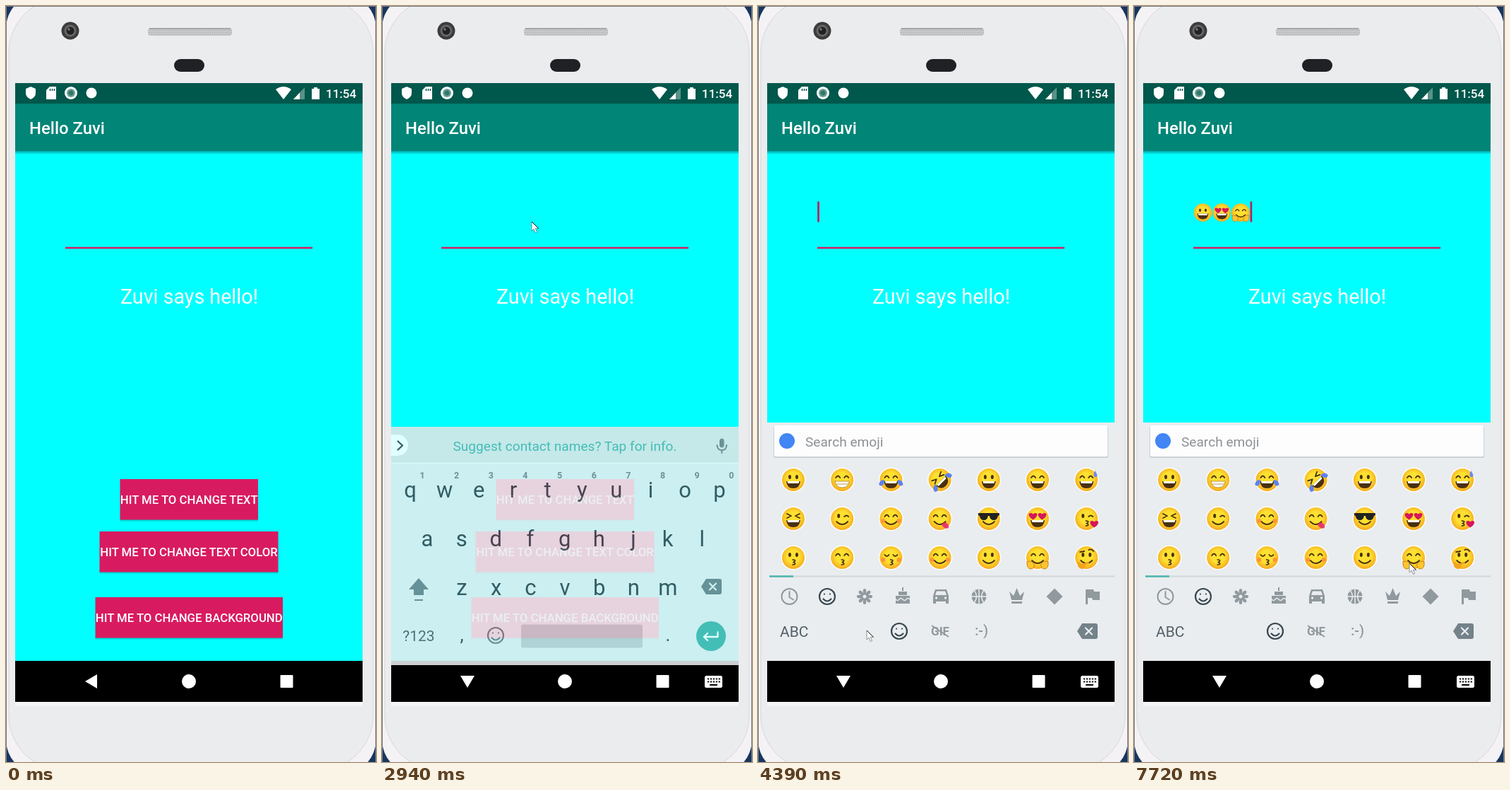
An HTML page that plays this animation: 524 by 1069 pixels, repeating every 8000 ms.

```html
<!DOCTYPE html>
<html lang="en">
<head>
<meta charset="utf-8">
<style>
html, body { margin: 0; width: 100%; height: 100%; overflow: hidden; background: #fff; }
svg { display: block; width: 100vw; height: 100vh; font-family: Roboto, sans-serif; }
.mid { text-anchor: middle; }
.medium { font-weight: 500; }
.line { fill: none; stroke-linecap: round; stroke-linejoin: round; }
</style>
</head>
<body>
<svg viewBox="0 0 524 1069">
  <defs>
    <radialGradient id="skin" cy=".45" r=".55">
      <stop offset=".5" stop-color="#fde030"/><stop offset="1" stop-color="#f5a91f"/>
    </radialGradient>
    <linearGradient id="shade" x2="0" y2="1">
      <stop stop-color="#000" stop-opacity=".35"/><stop offset="1" stop-color="#000" stop-opacity="0"/>
    </linearGradient>
    <pattern id="mesh" width="3" height="3" patternUnits="userSpaceOnUse">
      <rect width="3" height="3" fill="#c9cbcb"/><circle cx="1.5" cy="1.5" r=".8" fill="#aeb1b1"/>
    </pattern>
    <path id="erase" d="M-14 0L-7-11H12Q15-11 15-8V8Q15 11 12 11H-7Z"/>
    <g id="smiley" class="line" stroke-width="2.2">
      <circle r="11"/><path d="M-5.5 3.5Q0 9.5 5.5 3.5M-4-3.5v.1M4-3.5v.1"/>
    </g>
  </defs>

  <!-- phone -->
  <rect width="524" height="1069" fill="#17365d"/>
  <rect y="-18" width="524" height="1105" rx="50" fill="#f4f2f5"/>
  <rect x="4" y="-12" width="516" height="1093" rx="78" fill="#ebecee" stroke="#d9d6da"/>
  <path d="M.5 1069V.5H523.5V1069" fill="none" stroke="#77797c"/>
  <circle cx="91" cy="35" r="12.5" fill="#3c3c3c"/>
  <circle cx="91" cy="35" r="8.5" fill="#666"/>
  <circle cx="91" cy="35" r="5.5" fill="#222"/>
  <circle cx="89" cy="33" r="1.8" fill="#778"/>
  <rect x="201" y="31" width="119" height="11" rx="4" fill="url(#mesh)"/>
  <path d="M203 32H318" stroke="#9b9e9e" stroke-width="1.5"/>
  <rect x="238" y="75" width="43" height="18" rx="9" fill="#202124"/>
  <rect x="13" y="984" width="492" height="6" fill="#f5f5f7"/>

  <!-- app -->
  <rect x="13" y="109" width="492" height="817" fill="#0ff"/>
  <rect x="13" y="205" width="492" height="5" fill="url(#shade)"/>
  <rect x="13" y="109" width="492" height="29" fill="#00574b"/>
  <rect x="13" y="138" width="492" height="67" fill="#008577"/>
  <g fill="#fff">
    <path d="M35 114L42 117V123Q42 129 35 132Q28 129 28 123V117Z"/>
    <path d="M62 114H71V132H57V119Z"/>
    <path d="M62.500 117v3M65.500 117v3M68.500 117v3" stroke="#00574b" stroke-width="1.5"/>
    <circle cx="92" cy="123" r="9"/><circle cx="92" cy="123" r="6" fill="#6b9f96"/>
    <circle cx="92" cy="123" r="3.500" fill="#2f776b"/>
    <circle cx="121" cy="123" r="7.500"/>
    <path d="M382 118Q393 110 404 118L393 132Z"/>
    <path d="M407 132L423 115V132Z" opacity=".35"/><path d="M407 132L416 122.500V132Z"/>
    <path d="M436 115H441V117H444V132H433V117H436Z"/>
    <text class="medium" x="453" y="130" font-size="17">11:54</text>
    <text class="medium" x="33" y="180.500" font-size="23.900">Hello Zuvi</text>
    <text class="mid" x="259.500" y="421" font-size="28.700">Zuvi says hello!</text>
  </g>
  <path d="M84 342H434" stroke="#d81b60" stroke-width="2.400"/>
  <g id="buttons" class="mid medium" font-size="16.750"></g>
  <g id="typed"></g>
  <rect id="caret" y="276.500" width="2.600" height="29" fill="#c2185b"/>

  <!-- navigation -->
  <rect x="13" y="926" width="492" height="58" fill="#000"/>
  <g fill="#fff">
    <path id="back"/>
    <circle cx="259" cy="955" r="10"/><rect x="388.500" y="946" width="18" height="18" rx="1"/>
    <g id="switcher">
      <rect x="457" y="947" width="25" height="17" rx="2.500"/>
      <path d="M461 951.500H479M461 955.500H479" stroke="#000" stroke-width="2.200" stroke-dasharray="2.200 1.700"/>
      <path d="M464 960H475" stroke="#000" stroke-width="2"/>
    </g>
  </g>

  <!-- letter keyboard -->
  <g id="letters" fill="#37474f">
    <rect x="13" y="589" width="492" height="337" fill="#e9edf0"/>
    <rect x="13" y="589" width="492" height="51" fill="#e1e5e7"/>
    <path d="M13 640.500H505" stroke="#f4f6f7" stroke-width="2"/>
    <path d="M13 600H22A15 15 0 0 1 22 630H13Z" fill="#fff"/>
    <path class="line" d="M22.500 609.500L29 615.500L22.500 621.500" stroke="#37474f" stroke-width="2.300"/>
    <text class="mid" x="259" y="622.500" font-size="19.100" fill="#4db6ac">Suggest contact names? Tap for info.</text>
    <g fill="#78848b" stroke="#78848b">
      <rect x="478.500" y="606" width="5.500" height="12" rx="2.750"/>
      <path class="line" d="M474.500 615Q475 622 481.300 622T488 615M481.300 622V626" stroke-width="2"/>
    </g>
    <g id="keys" class="mid"></g>
    <path d="M52 803L66 819H59V827H45V819H38ZM46 833H58V835H46Z" fill="#74828a"/>
    <use href="#erase" x="466" y="815" fill="#74828a"/>
    <path class="line" d="M464 810.500l9 9m0-9l-9 9" stroke="#e9edf0" stroke-width="2.300"/>
    <use href="#smiley" x="161" y="884" stroke="#74828a"/>
    <rect x="197" y="868.500" width="172" height="33" rx="3" fill="#c8cdd1"/>
    <circle cx="466" cy="885" r="21" fill="#4db6ac"/>
    <path class="line" d="M475.500 879.500V886H456M461 881L456 886L461 891" stroke="#fff" stroke-width="2.400"/>
  </g>

  <!-- emoji keyboard -->
  <g id="emoji">
    <rect x="13" y="589" width="492" height="337" fill="#e9edf0"/>
    <rect x="22" y="594" width="474" height="45" rx="2" fill="#cdd1d4"/>
    <rect x="23" y="593" width="472" height="44" rx="2" fill="#fdfdfd"/>
    <circle cx="41" cy="615" r="11" fill="#4285f4"/>
    <text x="67" y="622.500" font-size="19.100" fill="#8c9194">Search emoji</text>
    <g id="faces"></g>
    <path d="M16 806.500H505" stroke="#d3d8da" stroke-width="2"/>
    <path d="M16 806.500H50" stroke="#4db6ac" stroke-width="2.500"/>
    <g fill="#90999e" stroke="#90999e" stroke-width="0">
      <g class="line" stroke-width="2"><circle cx="44.500" cy="835" r="11"/><path d="M44.500 828V836L50 839.500"/></g>
      <g id="flower" transform="translate(151 835)"></g>
      <path d="M195 845V834H215V845ZM199 833V828H211V833ZM204 827V822H206V827Z"/>
      <path class="line" d="M195 839q2.500 3 5 0t5 0t5 0t5 0" stroke="#e9edf0" stroke-width="1.500"/>
      <path d="M248 845V834L251 825H267L270 834V845H266V842H252V845Z"/>
      <path d="M251 833L253 827.500H265L267 833Z" fill="#e9edf0"/>
      <circle cx="252.500" cy="837" r="1.700" fill="#e9edf0"/><circle cx="265.500" cy="837" r="1.700" fill="#e9edf0"/>
      <circle cx="313" cy="835" r="10.500"/>
      <path d="M313 824V846M302 835H324M306 826Q313 835 306 844M320 826Q313 835 320 844" fill="none" stroke="#e9edf0" stroke-width="1.500"/>
      <path d="M359 840L356 828L362 834L366.500 823L371 834L377 828L374 840ZM359 842H374V845H359Z"/>
      <path d="M420 823.500L431.500 835L420 846.500L408.500 835Z"/>
      <path d="M464 825H475L476 828H484V840H474L473 837H467V846H464Z"/>
      <text class="mid" x="258" y="890" font-size="17" font-weight="700">GIF</text>
      <path d="M246 876L270 892" stroke-width="2"/>
    </g>
    <use href="#smiley" x="98" y="835" stroke="#37474f"/>
    <use href="#smiley" x="200" y="884" stroke="#37474f"/>
    <text x="31" y="892" font-size="21" fill="#546067">ABC</text>
    <text class="mid medium" x="316.500" y="890" font-size="20" fill="#90999e">:-)</text>
    <use href="#erase" x="466" y="884" fill="#74828a"/>
    <path class="line" d="M464 879.500l9 9m0-9l-9 9" stroke="#e9edf0" stroke-width="2.300"/>
  </g>

  <g id="pointer">
    <path d="M0 0V13L3 10.200L5.300 15.500L7.500 14.500L5.200 9.400H9.500Z" fill="#fff" stroke="#666" stroke-width=".7"/>
    <path d="M0 0L9.500 9.400" stroke="#111"/>
  </g>
</svg>
<script>
const $ = id => document.getElementById(id);
const show = (id, on) => $(id).setAttribute('visibility', on ? 'visible' : 'hidden');
const move = (id, x, y) => $(id).setAttribute('transform', `translate(${x} ${y})`);

const button = (label, x, y, width) => `
  <rect x="${x}" y="${y + 55}" width="${width}" height="6" fill="url(#shade)"/>
  <rect x="${x}" y="${y}" width="${width}" height="57.5" fill="#d81b60"/>
  <text x="${x + width / 2}" y="${y + 35}" fill="#fff">${label}</text>`;
$('buttons').innerHTML = button('HIT ME TO CHANGE TEXT', 161.5, 669, 195.5) +
  button('HIT ME TO CHANGE TEXT COLOR', 132.5, 743, 253) +
  button('HIT ME TO CHANGE BACKGROUND', 126.5, 836, 265.5);

// keyboard letters
const KEY_STEP = 48.65;
const label = (text, x, y, size, extra = '') => `<text x="${x}" y="${y}" font-size="${size}" ${extra}>${text}</text>`;
const keyRow = (chars, x, y, size, extra) => [...chars].map((c, i) => label(c, x + i * KEY_STEP, y, size, extra)).join('');
$('keys').innerHTML = keyRow('qwertyuiop', 40, 689, 31) + keyRow('asdfghjkl', 64, 758, 31) +
  keyRow('zxcvbnm', 113, 827, 31) + keyRow('1234567890', 57, 662, 12.5, 'font-weight="700" fill="#78848b"') +
  label('?123', 52, 892, 21, 'fill="#546067"') + label(',', 113, 892, 26) + label('.', 405, 892, 26);

$('flower').innerHTML = Array.from({ length: 8 }, (_, i) =>
  `<ellipse cy="-7.5" rx="2.3" ry="3.6" transform="rotate(${i * 45})"/>`).join('') +
  '<circle r="4" fill="none" stroke-width="3"/>';

// emoji parts, centred on a face of radius 16
const INK = '#49300f';
const stroke = (d, color = INK, width = 1.8) => `<path class="line" d="${d}" stroke="${color}" stroke-width="${width}"/>`;
const fill = (d, color = INK) => `<path d="${d}" fill="${color}"/>`;
const heart = (x, y, s) => `<path transform="translate(${x} ${y}) scale(${s})" fill="#d5175b" d="M0 5C-9-1-5-6 0-2.500C5-6 9-1 0 5Z"/>`;
const dot = x => `<ellipse cx="${x}" cy="-4" rx="2" ry="2.900" fill="${INK}"/>`;
const eyes = {
  dots: dot(-5) + dot(5),
  arcs: stroke('M-9-3Q-6-8-3-3M3-3Q6-8 9-3'),
  closed: stroke('M-9-4Q-6 0-3-4M3-4Q6 0 9-4'),
  tight: stroke('M-9-7L-3-4L-9-1M9-7L3-4L9-1'),
  wink: dot(-5) + stroke('M3-3Q6-6 9-3'),
  hearts: heart(-6.5, -4, 1.1) + heart(6.5, -4, 1.1),
  shades: fill('M-15-8H15V-5L13-4Q12 2 7 2Q2 2 1-4H-1Q-2 2-7 2Q-12 2-13-4L-15-5Z', '#222'),
};
const mouths = {
  open: fill('M-10 2H10Q9 12 0 12T-10 2Z') + fill('M-8.500 2H8.500L7.500 5H-7.500Z', '#fff'),
  grin: fill('M-10 2H10Q9 11 0 11T-10 2Z', '#fff') + stroke('M-10 2H10Q9 11 0 11T-10 2ZM-8 6H8', '#b58a3a', .9),
  smile: stroke('M-8 4Q0 12 8 4'),
  kiss: stroke('M-1 3Q4 3 2 5.500L0 6.500L2 7.500Q4 10-1 10', INK, 1.6),
};
const extras = {
  none: '',
  blush: '<circle cx="-11" cy="3" r="3" fill="#ff7043" opacity=".6"/><circle cx="11" cy="3" r="3" fill="#ff7043" opacity=".6"/>',
  tears: fill('M-9 0Q-17 0-17 7Q-13 11-10 5ZM9 0Q17 0 17 7Q13 11 10 5Z', '#5c82f0'),
  sweat: fill('M12-13Q18-4 13-4T12-13Z', '#6b87ef'),
  tongue: fill('M2 8L8 5Q14 9 12 13Q7 16 2 8Z', '#e8396b'),
  heart: heart(11, 7, 1.1),
  hands: ['M-15 6Q-9 3-5 9Q-4 15-9 16Q-16 16-15 6Z', 'M15 6Q9 3 5 9Q4 15 9 16Q16 16 15 6Z']
    .map(d => fill(d, '#ffc52e') + stroke(d, '#c98413', 1)).join(''),
  ponder: stroke('M-9-8L-3-9M3-11Q7-13 10-9') + fill('M-13 7L-10 6L-8 9L3 6L4 8L-2 11Q-1 16-7 16Q-13 15-13 7Z', '#f3a51c'),
};
const face = (name, x, y, scale = 1) => {
  const [eye, mouth, extra = 'none', tilt = 0] = name.split(' ');
  return `<g transform="translate(${x} ${y}) scale(${scale}) rotate(${tilt})">
    <circle r="16" fill="url(#skin)" stroke="#fff" stroke-width="${scale < 1 ? 0 : 3}" paint-order="stroke"/>
    ${eyes[eye]}${mouths[mouth]}${extras[extra]}</g>`;
};
const palette = [
  'dots open', 'arcs grin', 'arcs open tears', 'tight open tears -45', 'dots open', 'arcs open', 'arcs open sweat',
  'tight open', 'wink smile', 'arcs smile blush', 'arcs smile tongue', 'shades smile', 'hearts open', 'wink kiss heart',
  'dots kiss', 'arcs kiss', 'closed kiss blush', 'arcs smile blush', 'dots smile', 'arcs smile hands', 'dots smile ponder',
];
$('faces').innerHTML = palette.map((name, i) => face(name, 50 + i % 7 * 69.2, 670 + Math.floor(i / 7) * 55)).join('');

const CHAR_WIDTH = 26.8;
$('typed').innerHTML = [0, 12, 19].map((n, i) => face(palette[n], 97.5 + i * CHAR_WIDTH, 292, .8)).join('');

// timeline, in milliseconds
const LOOP = 8000;
const caretToggles = [400, 980, 1400, 1950, 2660, 2940, 3380, 3820, 4390, 4930, 5340, 6030, 6450, 7315, 7720];
const typeTimes = [5480, 6730, 7720];
const pointerPath = [
  [710, 483, 601], [845, 430, 505], [980, 374, 417], [1260, 345, 390], [1400, 300, 358], [1540, 262, 332],
  [1680, 232, 315], [1815, 217, 307], [1950, 212, 305], [3060, 209, 318], [3230, 204, 400], [3380, 196, 560],
  [3530, 180, 760], [3675, 165, 930], [3820, 157, 994], [3970, 147, 880], [4120, 154, 883], [4790, 150, 868],
  [4930, 130, 800], [5065, 95, 735], [5205, 60, 690], [5340, 43, 668], [5880, 76, 683], [6030, 170, 713],
  [6170, 280, 727], [6310, 360, 728], [6450, 384, 728], [7180, 392, 745], [7315, 408, 775], [7450, 415, 800],
  [7585, 398, 793], [7720, 390, 788],
];
const passed = (times, t) => times.filter(time => time <= t).length;

function draw(t) {
  const typedCount = passed(typeTimes, t);
  [...$('typed').children].forEach((g, i) => g.setAttribute('visibility', i < typedCount ? 'visible' : 'hidden'));
  show('caret', passed(caretToggles, t) % 2);
  $('caret').setAttribute('x', 84.2 + typedCount * CHAR_WIDTH);

  const editing = t >= 2660, rising = t < 3060;
  $('back').setAttribute('d', editing ? 'M111 947H131L121 964Z' : 'M112 955L129 945V965Z');
  show('switcher', editing);
  show('letters', t >= 2940 && t < 4390);
  $('letters').setAttribute('opacity', rising ? .88 : 1);
  move('letters', 0, rising ? 6 : 0);
  show('emoji', t >= 4390);

  const spot = pointerPath.findLast(([time]) => time <= t);
  show('pointer', spot);
  if (spot) move('pointer', spot[1], spot[2]);
}

function tick() {
  draw(performance.now() % LOOP);
  requestAnimationFrame(tick);
}
tick();
</script>
</body>
</html>
```
